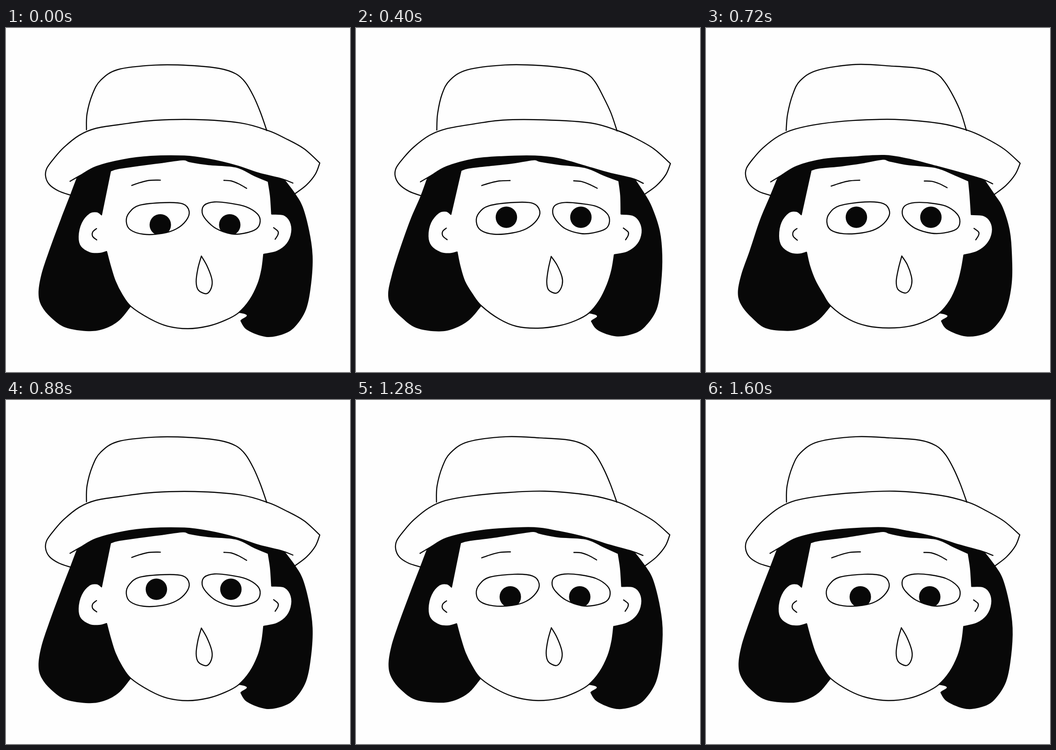
An HTML page with a canvas that plays this animation: 748 px wide and 748 px high, repeating every 1.68 s.

```html
<!DOCTYPE html>
<html lang="en">
<head>
<meta charset="utf-8">
<title>Girl in a hat</title>
<style>
html, body { margin: 0; width: 100%; height: 100%; overflow: hidden; background: #fefefe; }
canvas { display: block; width: 100vw; height: 100vh; }
</style>
</head>
<body>
<canvas id="stage" width="748" height="748"></canvas>
<script>
const ctx = document.getElementById('stage').getContext('2d');
const INK = '#080808', PAPER = '#fefefe';
const STEP = 80, STEPS = 21, WOBBLE = 0.8;

// Key points of each stroke; "|" marks a corner.
const crown = '175,222 177,187 188,144 205,114 243,91 325,80 400,82 465,88 500,99 520,118 538,149 554,184 567,223';
const brim = '141,364 115,355 95,341 86,323 88,305 103,284 125,260 159,234 195,219 250,209 320,201 410,199 510,207 570,223 606,239 648,263 683,294 | 673,318 653,342 628,361';
const rim = '162,321 197,301 255,286 315,280 388,278 440,285 500,300 550,315 600,328';
const hairL = '154,327 139,366 118,417 94,485 77,537 70,577 77,604 98,629 130,652 179,659 214,653 246,635 272,605';
const hairR = '506,620 511,638 526,657 565,671 602,666 628,650 653,612 664,555 666,495 660,440 645,390 629,362 608,332';
const earL = '207,406 197,399 180,402 163,423 157,453 163,475 183,489 203,491 219,487';
const jaw = '226,517 237,550 253,579 272,605 312,633 350,648 396,653 442,648 478,636 506,620 530,592 547,557 556,525 561,493';
const earR = '590,486 612,469 622,444 618,421 603,407 577,405';
const fringe = '575,365 571,333 | 540,320 500,303 440,297 400,290 385,286 340,293 295,299 245,305 228,310 |';
const eyeL = '262,421 268,402 290,386 345,379 385,382 399,399 392,419 370,437 340,446 300,448 271,439';
const eyeR = '427,402 432,386 454,379 488,381 522,388 546,404 552,421 544,437 517,446 490,447 456,436 435,418';
const nose = '425,496 | 437,515 447,541 448,557 442,572 433,577 418,569 414,551 418,523';
const marks = [
  '273,343 291,337 312,332 335,331', '474,332 490,333 507,339 524,348',
  '197,436 189,443 189,453 198,461', '582,435 592,443 592,450 586,460'
];

const hair = [hairL, hairR, rim.split(' ').reverse().join(' ')].join(' | ');
const face = [earL, jaw, earR, fringe].join(' | ');
const lines = [crown, brim, `140,334 ${rim} 624,338`, ...marks];

// Each redrawing bends the paper a little differently.
const wobble = (x, y, k) => [
  x + WOBBLE * Math.sin(y / 23 + x / 61 + k * 2.1),
  y + WOBBLE * Math.sin(x / 27 + y / 53 + k * 1.7)
];

// Smooth line through the points; a closed line without corners wraps round.
function trace(text, k, closed) {
  const path = new Path2D();
  const parts = text.split('|').map(part =>
    (part.match(/\S+/g) || []).map(s => wobble(...s.split(',').map(Number), k)));
  const loop = closed && parts.length === 1;
  const first = parts[0][0];
  if (closed && !loop) parts[parts.length - 1].push(first);
  path.moveTo(...first);
  let last;
  for (const p of parts) {
    if (last) p.unshift(last);
    const n = p.length;
    const at = i => p[loop ? (i + n) % n : Math.max(0, Math.min(n - 1, i))];
    for (let i = 0; i < (loop ? n : n - 1); i++) {
      const [a, b, c, d] = [at(i - 1), at(i), at(i + 1), at(i + 2)];
      path.bezierCurveTo(
        b[0] + (c[0] - a[0]) / 6, b[1] + (c[1] - a[1]) / 6,
        c[0] - (d[0] - b[0]) / 6, c[1] - (d[1] - b[1]) / 6, ...c);
    }
    last = p[n - 1];
  }
  return path;
}

const heads = [0, 1, 2, 3].map(k => ({
  hair: trace(hair, k, true),
  face: trace(face, k, true),
  eyes: [eyeL, eyeR].map(eye => trace(eye, k, true)),
  lines: [trace(nose, k, true), ...lines.map(line => trace(line, k))]
}));

function ease(t) {
  t = Math.max(0, Math.min(1, t));
  return t * t * (3 - 2 * t);
}

function pupil(eye, x, y) {
  ctx.save();
  ctx.clip(eye);
  ctx.beginPath();
  ctx.arc(x, y, 23.3, 0, Math.PI * 2);
  ctx.fill();
  ctx.restore();
}

function draw(step) {
  // The four redrawings take turns, with two jumps in the cycle.
  const turn = step + (step > 7 ? 1 : 0) + (step > 14 ? 2 : 0);
  const head = heads[turn % heads.length];
  const up = ease(step / 3) - ease((step - 11) / 3);

  ctx.fillStyle = PAPER;
  ctx.fillRect(0, 0, 748, 748);
  ctx.strokeStyle = INK;
  ctx.lineWidth = 2.4;
  ctx.lineCap = ctx.lineJoin = 'round';

  ctx.fillStyle = INK;
  ctx.fill(head.hair);
  ctx.fillStyle = PAPER;
  ctx.fill(head.face);
  ctx.stroke(head.face);

  ctx.fillStyle = INK;
  const y = 428 - 16.5 * up;
  pupil(head.eyes[0], 335.5 - 8.5 * up, y);
  pupil(head.eyes[1], 486.5 + 2.5 * up, y);
  for (const line of [...head.eyes, ...head.lines]) ctx.stroke(line);
}

let shown = -1;
const start = performance.now();
function tick(now) {
  const step = Math.floor(Math.max(0, now - start) / STEP) % STEPS;
  if (step !== shown) draw(shown = step);
  requestAnimationFrame(tick);
}
tick(start);
</script>
</body>
</html>
```
